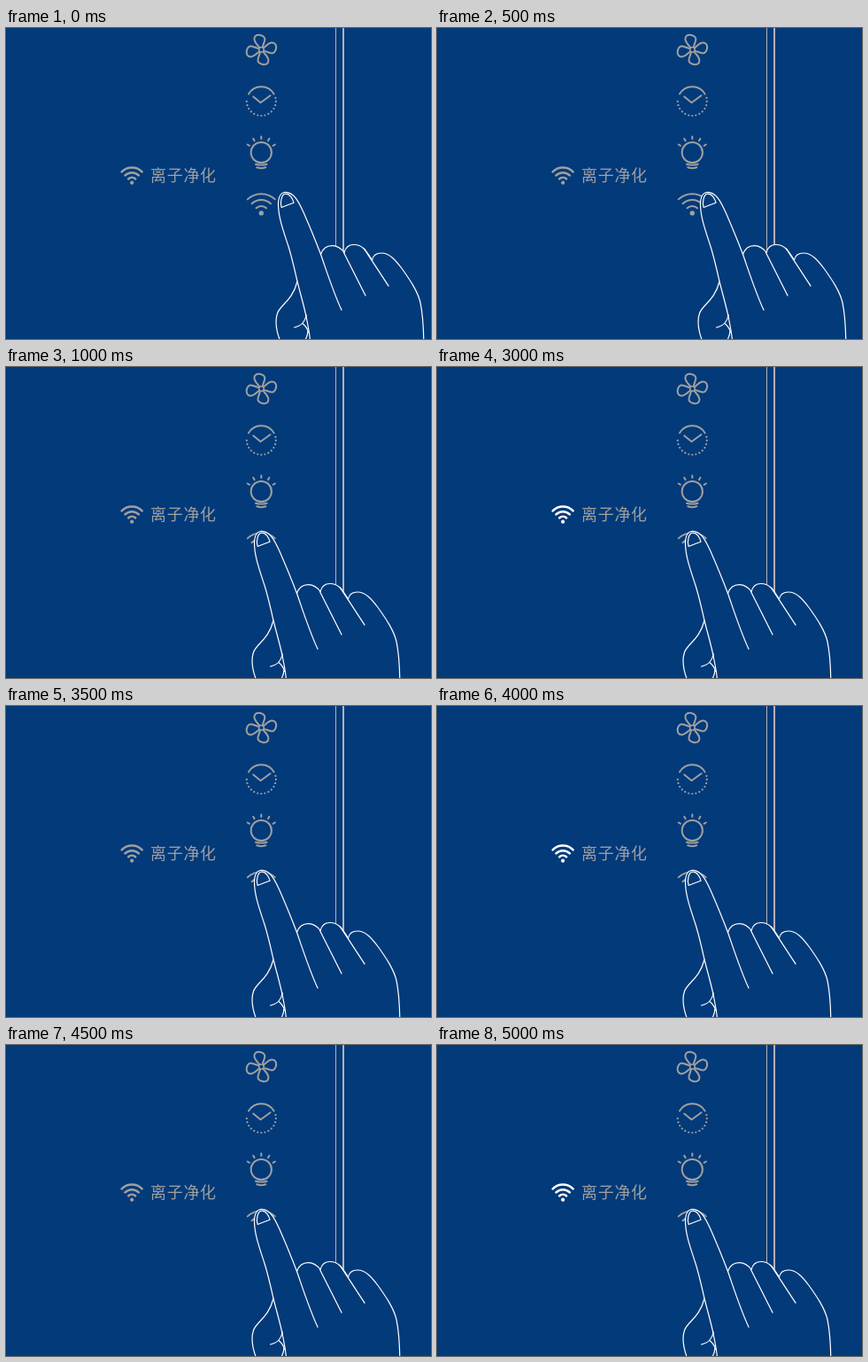
Animation, 480 px wide and 351 px high, one loop 5500 ms. Source, as an HTML page:

```html
<!DOCTYPE html>
<html lang="zh-CN">
<head>
<meta charset="utf-8">
<title>离子净化</title>
<style>
  html, body { margin: 0; width: 100%; height: 100%; overflow: hidden; background: #033a7a; }
  svg { display: block; width: 100vw; height: 100vh; }
  .icon { fill: none; stroke: #9fa0a0; stroke-width: 2; stroke-linecap: round; stroke-linejoin: round; }
  .dot { fill: currentColor; stroke: none; }
  .label { font: 500 18px "Noto Sans CJK SC", "Noto Sans CJK", sans-serif; letter-spacing: .7px; fill: #9fa0a0; }
  .hand { fill: none; stroke: #fff; stroke-width: 1.2; stroke-linecap: round; stroke-linejoin: round;
    animation: reach 5.5s step-end infinite; }
  .skin { fill: #033a7a; }
  .signal { fill: none; stroke: currentColor; stroke-width: 2.6; stroke-linecap: round; color: #9fa0a0;
    animation: blink 5.5s step-end infinite; }
  @keyframes reach {
    0% { transform: translateX(0); }
    9.0909% { transform: translateX(-10px); }
    18.1818%, 100% { transform: translateX(-27px); }
  }
  @keyframes blink {
    0%, 63.6363%, 81.8181% { color: #9fa0a0; }
    54.5454%, 72.7272%, 90.909% { color: #fff; }
    100% { color: #fff; }
  }
</style>
</head>
<body>
<svg viewBox="0 0 480 351">
  <defs>
    <path id="blade" d="M-2.2-2.6C-4.6-5.6-8-8.4-8-12.2C-8-16-4.5-17.2-1.2-16.6C2.6-15.9 4.4-13.6 3.8-10.6C3.3-8 2-5.6 1.4-3"/>
    <path id="ray" d="M0-15.4V-18"/>
  </defs>

  <path d="M372.5 0V300" stroke="#b4b2b6" fill="none"/>
  <path d="M381 0V300" stroke="#b4b2b6" stroke-width="2" fill="none"/>

  <!-- fan -->
  <g class="icon" transform="translate(288.4 24.5)">
    <use href="#blade"/>
    <use href="#blade" transform="rotate(90)"/>
    <use href="#blade" transform="rotate(180)"/>
    <use href="#blade" transform="rotate(270)"/>
    <circle r="2.8" stroke-width="1.6"/>
  </g>

  <!-- timer -->
  <g class="icon" transform="translate(288.3 82.7)">
    <path d="M-14.3-8.3A16.5 16.5 0 0 1 14.3-8.3"/>
    <path d="M16.1-3.8A16.5 16.5 0 1 1-16.1-3.8" pathLength="140" stroke-width="2.2" stroke-dasharray="0 10"/>
    <path d="M-9-5.2L-.8 1.5L10.2-6.5"/>
  </g>

  <!-- lamp -->
  <g class="icon" transform="translate(288.3 140.5)">
    <circle r="11.6"/>
    <use href="#ray"/>
    <use href="#ray" transform="rotate(-30)"/>
    <use href="#ray" transform="rotate(30)"/>
    <use href="#ray" transform="rotate(-60)"/>
    <use href="#ray" transform="rotate(60)"/>
    <path d="M-6.3 13.2Q0 15 6.3 13.2M-5 16.8Q0 18.6 5 16.8"/>
  </g>

  <!-- ionizer -->
  <g class="icon" color="#9fa0a0">
    <path d="M272.8 193.4A22.3 22.3 0 0 1 303.8 193.4M277.6 198.3A15.4 15.4 0 0 1 299 198.3M282.6 203.2A8.2 8.2 0 0 1 294 203.2"/>
    <circle class="dot" cx="288.3" cy="208.9" r="2.7"/>
  </g>

  <g class="signal">
    <path d="M130.7 162.3A16.3 16.3 0 0 1 153.7 162.3M134.5 166.4A11 11 0 0 1 149.9 166.4M138.3 170.3A5.6 5.6 0 0 1 146.1 170.3"/>
    <circle class="dot" cx="142.2" cy="174.7" r="2.1"/>
  </g>
  <text class="label" x="163" y="173.2">离子净化</text>

  <g class="hand">
    <path class="skin" d="M309.5 353C305 341 303.500 331 306.500 322C310 312 323.500 308 329 286
      C326 273 322.500 257 318.500 245C313 228 307.500 213 307.500 199
      C307.500 190 311 185.300 316 185.300C325 185.300 330.500 196 336 208C343 224 350 241 355.500 255.500
      C358 248.500 363 245.700 368.500 245.700C374.500 245.700 379 249.500 382 253.500
      C383.500 247.500 388 244.500 393 244.500C404 244.500 408 254 413.500 262
      C414.500 256.500 418.500 254 424 254C433 254 440 262 447.500 272C456 284 465 297 468 310C470.500 322 471.500 337 471.800 353"/>
    <path d="M355.500 255.500C363 277 370 299 379 318.300M381.500 253.500L406 302M404.500 249.200L432 291.200"/>
    <path d="M329 286C333 302 337.500 317 339.500 328C341.500 338 343 346 343.500 353"/>
    <path d="M325.500 338C329.500 337 333 335.500 335 333C337.500 330 338.700 327 339.300 324M334.800 333.300C338 336 340.500 339.500 341.800 343.500M340.800 342C341 346 339.500 349 338 352"/>
    <path d="M311.200 202.500C309.300 197 311 187.200 316 187.200C320.500 187.200 323.800 192.500 325 197.200Q318.500 199.500 311.200 202.500Z"/>
  </g>
</svg>
</body>
</html>
```
